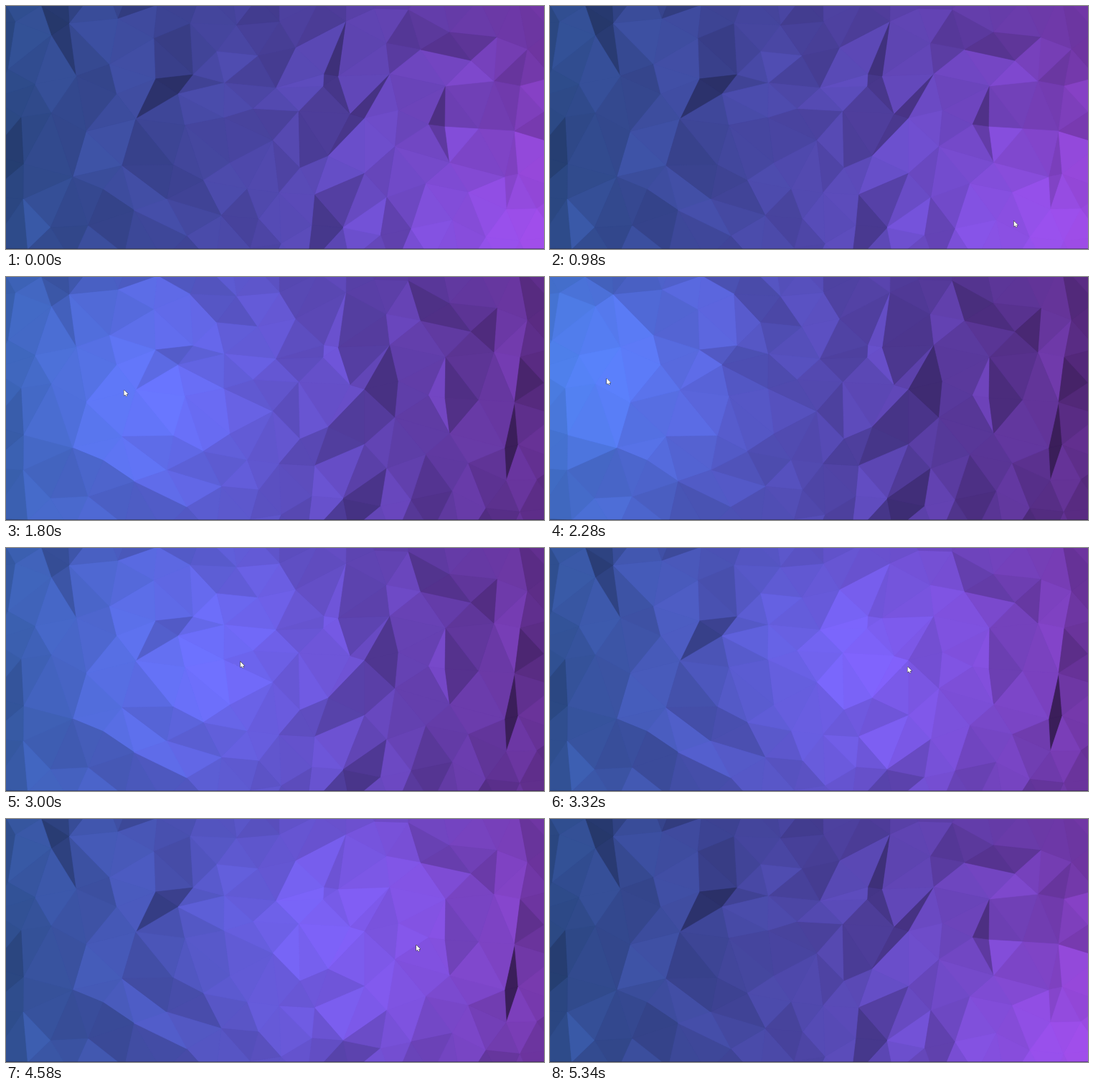
Animation, 750 px wide and 340 px high, one loop 5660 ms. Source, as an HTML page with a canvas:

```html
<!DOCTYPE html>
<html lang="en">
<head>
<meta charset="utf-8">
<title>Low-poly light</title>
<style>
  html, body { margin: 0; height: 100%; overflow: hidden; background: #4b4699; }
  canvas { display: block; }
</style>
</head>
<body>
<canvas id="stage" width="750" height="340"></canvas>
<script>
const W = 750, H = 340, LOOP = 5660;
const LIGHT_Z = 150, AMBIENT = 0.45, LAG = 90;
const SPACING = 42, MARGIN = 60, RELIEF = 5;
const ctx = document.getElementById('stage').getContext('2d');

// Key corners (x, y, height) that form the steepest facets
const anchors = [
  [63, 41, 0], [88, 24, 10], [98, 98, -2],
  [206, 45, -6], [208, 102, -5], [240, 123, 10], [261, 96, 1],
  [62, 310, -6], [93, 239, 5], [275, 244, 4], [300, 293, -3],
  [372, 188, 4], [408, 147, -5], [442, 112, -5], [443, 95, -2], [463, 98, 5],
  [480, 151, 3], [500, 157, 8], [500, 234, -5], [449, 210, 7], [430, 264, -5], [470, 310, 9],
  [530, 52, -4], [578, 61, 5], [547, 146, -6], [589, 166, -5], [612, 169, 6], [585, 248, -4],
  [680, 105, -6], [727, 60, 4], [717, 112, 6], [709, 175, 5], [714, 235, -6], [695, 239, 6]
];
// Pointer path as time, x, y
const path = [
  [860, 725, 330], [1290, 452, 231], [1950, 100, 143], [2280, 79, 142], [2560, 100, 148],
  [3320, 498, 166], [3600, 595, 168], [4150, 226, 139], [4260, 205, 142],
  [4580, 571, 176], [4870, 715, 285], [5250, 725, 330]
];

let seed = 11;
function random() {
  seed = (seed * 16807) % 2147483647;
  return seed / 2147483647;
}

// Fill the gaps between anchors with evenly spaced random corners
function scatter() {
  const points = [...anchors];
  for (let i = 0; i < 6000; i++) {
    const x = -MARGIN + random() * (W + 2 * MARGIN);
    const y = -MARGIN + random() * (H + 2 * MARGIN);
    if (points.every(p => Math.hypot(p[0] - x, p[1] - y) > SPACING))
      points.push([x, y, (random() * 2 - 1) * RELIEF]);
  }
  return points;
}

function circumcircle([a, b, c]) {
  const bx = b[0] - a[0], by = b[1] - a[1], cx = c[0] - a[0], cy = c[1] - a[1];
  const d = 2 * (bx * cy - by * cx), bb = bx * bx + by * by, cc = cx * cx + cy * cy;
  const x = (cy * bb - by * cc) / d, y = (bx * cc - cx * bb) / d;
  return { x: a[0] + x, y: a[1] + y, r2: x * x + y * y };
}

// Bowyer-Watson Delaunay triangulation
function triangulate(points) {
  const outer = [[-20000, -15000, 0], [21000, -15100, 0], [300, 25000, 0]];
  const make = corners => ({ corners, circle: circumcircle(corners) });
  let faces = [make(outer)];
  for (const p of points) {
    const edges = [];
    faces = faces.filter(({ corners, circle }) => {
      if ((p[0] - circle.x) ** 2 + (p[1] - circle.y) ** 2 >= circle.r2) return true;
      corners.forEach((a, i) => {
        const b = corners[(i + 1) % 3];
        const twin = edges.findIndex(e => e[0] === b && e[1] === a);
        if (twin < 0) edges.push([a, b]);
        else edges.splice(twin, 1);
      });
      return false;
    });
    for (const [a, b] of edges) faces.push(make([a, b, p]));
  }
  return faces.map(f => f.corners).filter(c => !c.some(p => outer.includes(p)));
}

function facet(corners) {
  const [a, b, c] = corners;
  const u = b.map((k, i) => k - a[i]), v = c.map((k, i) => k - a[i]);
  const n = [u[1] * v[2] - u[2] * v[1], u[2] * v[0] - u[0] * v[2], u[0] * v[1] - u[1] * v[0]];
  const size = Math.hypot(...n) * Math.sign(n[2]);
  return {
    corners,
    normal: n.map(k => k / size),
    center: a.map((k, i) => (k + b[i] + c[i]) / 3)
  };
}

const facets = triangulate(scatter()).map(facet);

// Smooth curve through the path keys
function pointerAt(t) {
  const last = path.length - 1;
  if (t <= path[0][0]) return path[0].slice(1);
  if (t >= path[last][0]) return path[last].slice(1);
  const i = path.findIndex(k => k[0] > t) - 1;
  const p = path[i], q = path[i + 1], span = q[0] - p[0], s = (t - p[0]) / span;
  const slope = (j, axis) => {
    const from = path[Math.max(j - 1, 0)], to = path[Math.min(j + 1, last)];
    return (to[axis] - from[axis]) / (to[0] - from[0]) * span;
  };
  return [1, 2].map(axis =>
    p[axis] + (q[axis] - p[axis]) * s * s * (3 - 2 * s) +
    slope(i, axis) * s * (1 - s) ** 2 - slope(i + 1, axis) * s * s * (1 - s));
}

function shade({ normal, center }, [lx, ly]) {
  const ray = [lx - center[0], ly - center[1], LIGHT_Z - center[2]];
  const dot = normal.reduce((sum, k, i) => sum + k * ray[i], 0) / Math.hypot(...ray);
  const glow = AMBIENT * normal[2] + (1 - AMBIENT) * Math.max(0, dot);
  const u = Math.min(1, Math.max(0, center[0] / W));
  const base = [82 + 80 * u, 136 - 58 * u, 248 + 64 * u * (1 - u) - 12 * u];
  return `rgb(${base.map(k => Math.round(Math.min(255, k * glow))).join()})`;
}

function drawCursor(x, y) {
  ctx.beginPath();
  for (const [dx, dy] of [[0, 0], [0, 8], [2, 6.4], [3.2, 9], [4.4, 8.4], [3.4, 6], [5.8, 5.8]])
    ctx.lineTo(x + dx, y + dy);
  ctx.closePath();
  ctx.lineWidth = 1;
  ctx.strokeStyle = '#222';
  ctx.stroke();
  ctx.fillStyle = '#fff';
  ctx.fill();
}

function draw(now) {
  const t = now % LOOP, light = pointerAt(t - LAG);
  ctx.lineWidth = 0.6;
  for (const f of facets) {
    ctx.fillStyle = ctx.strokeStyle = shade(f, light);
    ctx.beginPath();
    for (const [x, y] of f.corners) ctx.lineTo(x, y);
    ctx.closePath();
    ctx.fill();
    ctx.stroke();
  }
  ctx.fillStyle = 'rgba(40,40,55,.5)';
  ctx.fillRect(0, H - 1, W, 1);
  if (t > 860 && t < 4930) drawCursor(...pointerAt(t));
  requestAnimationFrame(() => draw(performance.now()));
}
draw(performance.now());
</script>
</body>
</html>
```
